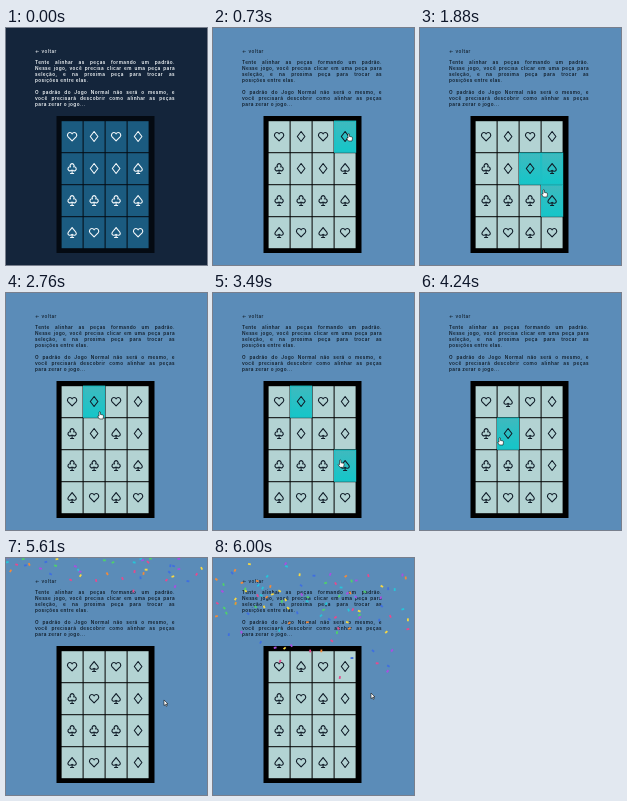
Animation, 201 px wide and 237 px high, one loop 6.03 s. Source, as an HTML page:

```html
<!DOCTYPE html>
<html lang="pt">
<head>
<meta charset="utf-8">
<title>Jogo de peças</title>
<style>
  html, body { margin: 0; width: 100%; height: 100%; overflow: hidden; }
  body {
    --bg: #5b8cb8; --ink: #101c28; --cell: #b3d3d3; --line: #000;
    position: relative; background: var(--bg); color: var(--ink);
    font: 600 4.7px/6px Inter, "Open Sans", sans-serif; letter-spacing: .4px;
  }
  body.dark { --bg: #14253b; --ink: #f4f8fa; --cell: #1b5b80; --line: #040a12; }
  .back, p { position: absolute; left: 29px; width: 140px; margin: 0; white-space: nowrap; }
  .back { top: 20px; font-weight: 500; }
  p span { display: block; text-align-last: justify; }
  p span:last-child { text-align-last: left; }
  svg { position: absolute; left: 0; top: 0; width: 201px; height: 237px; }
  .frame { fill: var(--line); }
  .cell { fill: var(--cell); }
  .cell.on { fill: url(#teal); stroke: #1fbfc4; stroke-width: 1.2; }
  .icon { fill: none; stroke: var(--ink); stroke-width: 1.1; stroke-linejoin: round; }
  .pointer { fill: #fff; stroke: #111; stroke-width: .6; stroke-linejoin: round; }
</style>
</head>
<body class="dark">
<div class="back">← voltar</div>
<p style="top:31px"><span>Tente alinhar as peças formando um padrão.</span><span>Nesse jogo, você precisa clicar em uma peça para</span><span>seleção, e na proxima peça para trocar as</span><span>posições entre elas.</span></p>
<p style="top:60.5px"><span>O padrão do Jogo Normal não será o mesmo, e</span><span>você precisará descobrir como alinhar as peças</span><span>para zerar o jogo...</span></p>
<svg viewBox="0 0 201 237">
  <defs>
    <linearGradient id="teal" x1="0" y1="0" x2="0" y2="1">
      <stop offset="0" stop-color="#3fb9be"/><stop offset="1" stop-color="#14c6c9"/>
    </linearGradient>
  </defs>
  <rect class="frame" x="50.5" y="88" width="98" height="137"/>
  <g id="board"></g>
  <g id="confetti"></g>
  <path id="pointer" class="pointer"/>
</svg>
<script>
const LOOP = 6030, LIGHT_AT = 60, PARTY_AT = 5420;
const COLS = 4, CELL_W = 22, CELL_H = 32, LEFT = 55.6, TOP = 93.2;

const icons = {
  h: 'M0 4.4L-4 .4C-5.6-1.6-4-4-2.2-4C-1-4-.3-3.3 0-2.6C.3-3.3 1-4 2.2-4C4-4 5.6-1.6 4 .4Z',
  d: 'M0-5L3.8 0L0 5L-3.8 0Z',
  s: 'M0-5C1.5-2.6 4.2-1 4.2 1C4.2 3 1.6 3.4 0 1.8C-1.6 3.4-4.2 3-4.2 1C-4.2-1-1.5-2.6 0-5ZM0 2V5M-2 5H2',
  c: 'M.7 1.7A2 2 0 1 0 1.6-1.6A2 2 0 1 0-1.6-1.6A2 2 0 1 0-.7 1.7ZM0 1.7V5M-2 5H2'
};
const arrow = 'M0 0V5.6L1.4 4.4L2.3 6.4L3.2 6L2.3 4H4Z';
const hand = 'M0 0Q.8-.7 1.4 0V2.4L4 3Q4.7 3.3 4.5 4.2L4 7H.5L-1.5 4.4Q-1.3 3.4 0 4.2Z';

const startBoard = 'hdhd cdds cccs shsh'.replace(/ /g, '');

// cells a and b: first click, second click, exchange
const swaps = [
  { a: 6, b: 7, first: 1200, second: 1600, done: 2150 },
  { a: 1, b: 11, first: 2800, second: 3350, done: 3900 },
  { a: 5, b: 15, first: 4220, second: 4800, done: 5400 }
];

// pointer path: time, x, y
const path = [
  [60, 160, 125], [500, 135, 106], [800, 135, 106], [1150, 112, 140],
  [1250, 112, 140], [1530, 131, 140], [1640, 131, 140], [1860, 123, 162],
  [2150, 123, 162], [2700, 93, 119], [2840, 93, 119], [3280, 128, 168],
  [3420, 128, 168], [4120, 79, 145], [4280, 79, 145], [4720, 131, 199],
  [4850, 131, 199], [5170, 158, 142], [5600, 158, 142], [5960, 158, 135]
];

function add(parent, name, attrs) {
  const el = document.createElementNS('http://www.w3.org/2000/svg', name);
  for (const key in attrs) el.setAttribute(key, attrs[key]);
  return parent.appendChild(el);
}

const boardEl = document.getElementById('board');
const confettiEl = document.getElementById('confetti');
const pointer = document.getElementById('pointer');

const cells = [...startBoard].map((suit, i) => {
  const x = LEFT + i % COLS * CELL_W, y = TOP + Math.floor(i / COLS) * CELL_H;
  return {
    box: add(boardEl, 'rect', { class: 'cell', x, y, width: CELL_W - 1, height: CELL_H - 1 }),
    icon: add(boardEl, 'path', { class: 'icon', transform: `translate(${x + 10.5} ${y + 15.3})` })
  };
});

let seed = 29;
function random() {
  seed = (seed * 16807) % 2147483647;
  return seed / 2147483647;
}

const colors = ['#f6d743', '#f08a3c', '#e64a8d', '#a94fe0', '#3f6fe0', '#27c4d8', '#4fd06a'];
const bits = Array.from({ length: 105 }, (_, i) => ({
  el: add(confettiEl, 'rect', { x: -1.4, y: -.9, width: 2.8, height: 1.8, fill: colors[i % colors.length] }),
  born: PARTY_AT + random() * 520,
  x: random() * 201,
  drift: (random() - .5) * .04,
  speed: .06 + random() * .12,
  spin: (random() - .5) * 1.4
}));

function pointerAt(t) {
  const next = path.findIndex(p => p[0] > t);
  if (next < 0) return path[path.length - 1].slice(1);
  if (next === 0) return path[0].slice(1);
  const [t0, x0, y0] = path[next - 1], [t1, x1, y1] = path[next];
  const u = (t - t0) / (t1 - t0), e = u * u * (3 - 2 * u);
  return [x0 + (x1 - x0) * e, y0 + (y1 - y0) * e];
}

function cellAt(x, y) {
  const col = Math.floor((x - LEFT) / CELL_W), row = Math.floor((y - TOP) / CELL_H);
  return col >= 0 && col < COLS && row >= 0 && row < COLS ? row * COLS + col : -1;
}

function draw(t) {
  const dark = t < LIGHT_AT;
  document.body.classList.toggle('dark', dark);

  const [x, y] = pointerAt(t);
  const hover = dark ? -1 : cellAt(x, y);
  const suits = [...startBoard], active = new Set([hover]);
  for (const { a, b, first, second, done } of swaps) {
    if (t >= done) [suits[a], suits[b]] = [suits[b], suits[a]];
    else {
      if (t >= first) active.add(a);
      if (t >= second) active.add(b);
    }
  }
  cells.forEach(({ box, icon }, i) => {
    box.classList.toggle('on', active.has(i));
    icon.setAttribute('d', icons[suits[i]]);
  });

  pointer.style.display = dark ? 'none' : '';
  pointer.setAttribute('d', hover < 0 ? arrow : hand);
  pointer.setAttribute('transform', `translate(${x} ${y})`);

  for (const b of bits) {
    const age = t - b.born;
    b.el.style.display = age < 0 ? 'none' : '';
    const fall = b.speed * age + .00006 * age * age - 2;
    b.el.setAttribute('transform', `translate(${b.x + b.drift * age} ${fall}) rotate(${b.spin * age})`);
  }
}

const start = performance.now();
function tick() {
  draw((performance.now() - start) % LOOP);
  requestAnimationFrame(tick);
}
tick();
</script>
</body>
</html>
```
